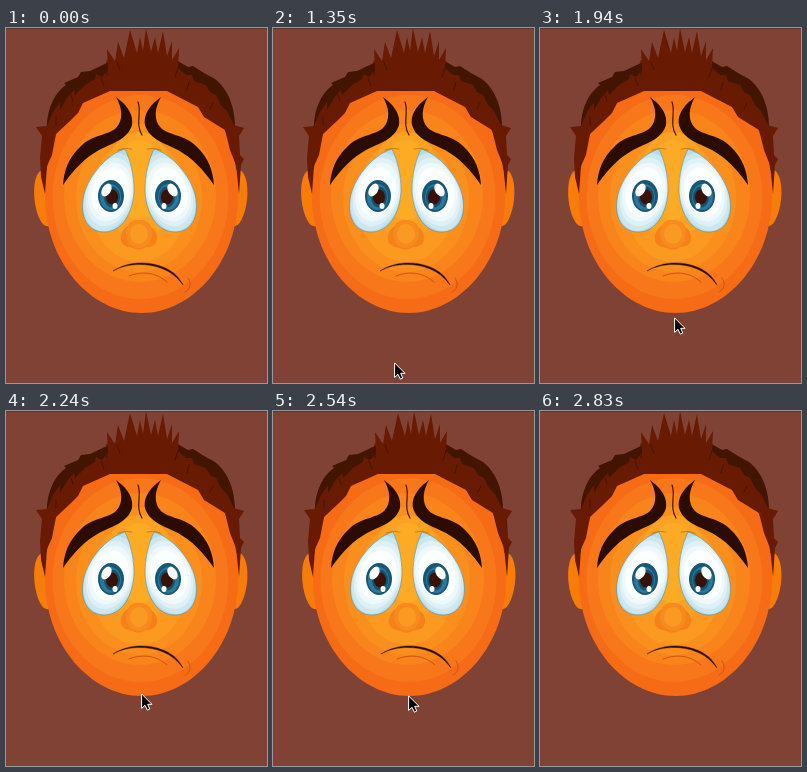
An HTML page that plays this animation: 261 px wide and 355 px high, repeating every 3730 ms.

```html
<!DOCTYPE html>
<html lang="en">
<head>
<meta charset="utf-8">
<title>Sad face</title>
<style>
  html, body { margin: 0; width: 100%; height: 100%; overflow: hidden; background: #814236; }
  svg { display: block; width: 261px; height: 355px; }
  .line { fill: none; stroke-linecap: round; }
  #head { animation: shake 3730ms step-end infinite; }
  #cursor { animation: move 3730ms step-end infinite; }

  @keyframes shake {
    0%      { transform: translate(0, 0); }
    64.075% { transform: translate(2px, 0); }
    68.097% { transform: translate(1px, 0); }
    71.850% { transform: translate(-2px, 0); }
    75.871%, 100% { transform: translate(0, 0); }
  }
  @keyframes move {
    0%      { transform: translate(116px, 400px); }
    24.129% { transform: translate(116px, 345px); }
    28.150% { transform: translate(116px, 343px); }
    32.172% { transform: translate(121px, 335px); }
    36.193% { transform: translate(121px, 334px); }
    40.214% { transform: translate(126px, 322px); }
    43.968% { transform: translate(132px, 308px); }
    47.989% { transform: translate(134px, 293px); }
    52.011% { transform: translate(134px, 289px); }
    56.032% { transform: translate(134px, 283px); }
    60.054% { transform: translate(135px, 282px); }
    64.075% { transform: translate(135px, 284px); }
    71.850% { transform: translate(119px, 308px); }
    75.871%, 100% { transform: translate(116px, 400px); }
  }
</style>
</head>
<body>
<svg viewBox="0 0 261 355">
  <defs>
    <path id="ear" d="M36 142C25 146 26 181 36 195C39 199 43 199 46 197L43 142Z"/>
    <path id="brow" d="M110 69C116 79 118 92 110 100C103 107 86 107 75 118C62 130 58 143 57 157C68 141 79 130 93 122C107 115 122 111 126 97C128 84 118 75 110 69Z"/>
    <path id="white" d="M119 121C104 125 86 143 79 163C72 185 80 204 98 204C116 204 127 185 128 163C128 146 124 131 119 121Z"/>
    <clipPath id="inWhite"><use href="#white"/></clipPath>
    <g id="eye">
      <use href="#white" fill="#b3dcec"/>
      <g clip-path="url(#inWhite)">
        <g transform="translate(104 164) rotate(17)">
          <ellipse rx="25" ry="40" fill="#cbe7f2"/>
          <ellipse rx="23" ry="35" fill="#dff1f7"/>
          <ellipse rx="21" ry="30" fill="#eff9fc"/>
          <ellipse rx="18" ry="25" fill="#fcffff"/>
        </g>
      </g>
      <use href="#white" fill="none" stroke="#5d8c93" stroke-width=".6"/>
      <g transform="translate(105 168)">
        <ellipse rx="13" ry="16" fill="#175775"/>
        <ellipse cx="-.5" cy="1" rx="10.5" ry="13" fill="#2a789d"/>
        <ellipse cx="1" cy="1" rx="8" ry="10.5" fill="#174e69"/>
        <ellipse cx="1" cy="1" rx="6" ry="7.5" fill="#391207"/>
        <ellipse rx="4.4" ry="7" fill="#fff" transform="translate(-4.5 -6) rotate(30)"/>
        <ellipse cx="4" cy="10" rx="2.5" ry="3" fill="#fff"/>
      </g>
    </g>
  </defs>

  <rect width="261" height="355" fill="#814236"/>
  <rect width="261" height="1" fill="#61342b"/>

  <g id="head">
    <g fill="#f77d08">
      <use href="#ear"/>
      <use href="#ear" transform="matrix(-1 0 0 1 269.5 0)"/>
    </g>

    <path fill="#431500" d="M41 104C40 84 47 66 60 57L58 55L72 49L75 44L84 43L103 34L170 32L182 39L187 38L198 45L209 51C222 61 230 80 229 104L210 95L135 50L60 100Z"/>

    <path fill="#f56b16" d="M39 168C39 233 84 285 135.5 285C187 285 232 233 232 168C232 120 215 70 165 55H105C55 70 39 120 39 168Z"/>
    <ellipse cx="134.5" cy="169" rx="88" ry="102" fill="#f7771a"/>
    <ellipse cx="134" cy="168" rx="76" ry="86" fill="#f9841c"/>
    <ellipse cx="133" cy="170" rx="63" ry="74" fill="#fa8f1e"/>
    <ellipse cx="133" cy="172" rx="49" ry="62" fill="#fb9921"/>
    <ellipse cx="133" cy="158" rx="36" ry="54" fill="#fca223"/>
    <ellipse cx="133" cy="152" rx="25" ry="40" fill="#fdab25"/>

    <path fill="#681a03" d="M39 166L35 149L34 130L36 108L30 99L41 98L47 84L54 74L54 82L61 70L68 62L69 67L79 57L89 51L90 46L96 49L102 42L101 21L109 33L112 14L118 30L124 2L131 25L134 9L137 23L140 0L145 24L149 9L152 25L157 3L161 28L166 13L166 32L173 20L172 40L180 47L186 47L188 53L200 57L204 64L210 67L215 77L221 83L228 97L238 100L233 108L234 127L238 131L235 137L233 166L230 137L224 122L219 102L198 89L192 79L161 63H104L77 75L72 85L64 93L50 106L46 127L41 138Z"/>
    <path class="line" stroke="#431500" stroke-width="1" d="M101 33V47M111 34L114 42M95 50L98 58M172 40L169 49M65 67L67 73M183 54L181 62M207 75L204 81M50 89V97"/>

    <g fill="#2b0c02">
      <use href="#brow"/>
      <use href="#brow" transform="matrix(-1 0 0 1 265 0)"/>
    </g>
    <path class="line" d="M132 74C136 84 129 96 136 107" stroke="#431503" stroke-width="1.2"/>
    <path class="line" d="M112 122Q119 119 126 121M141 121Q148 119 155 122" stroke="#b96712" stroke-width=".7"/>

    <use href="#eye"/>
    <use href="#eye" transform="matrix(-1 0 0 1 267 0)"/>

    <path fill="#f58118" d="M122 198C125 190 142 190 145 199C151 202 153 211 149 216C145 220 141 218 138 220C135 222 130 222 127 220C123 219 119 219 116 215C113 209 116 201 122 198Z"/>
    <ellipse cx="133" cy="206" rx="13" ry="14" fill="#f78b20"/>
    <ellipse cx="133" cy="206" rx="9" ry="10" fill="#fa9a22"/>

    <path fill="#2b0c02" d="M107 243C122 233 142 233 157 239C167 243 173 249 177 257C171 249 165 244 156 240.5C142 235 122 234.5 107 243Z" stroke="#2b0c02" stroke-width=".4"/>
    <path class="line" d="M123 248C136 243 150 244 161 254" stroke="#c64f10" stroke-width=".9"/>
    <path class="line" d="M182 250C186 256 184 262 179 264" stroke="#c64f10" stroke-width=".8"/>
  </g>

  <path id="cursor" d="M.6 .9V15.4L4 12.3L6.4 17.2L8.8 16L6.7 11.3H11Z" fill="#000" stroke="#fff" stroke-width="1"/>
</svg>
</body>
</html>
```
